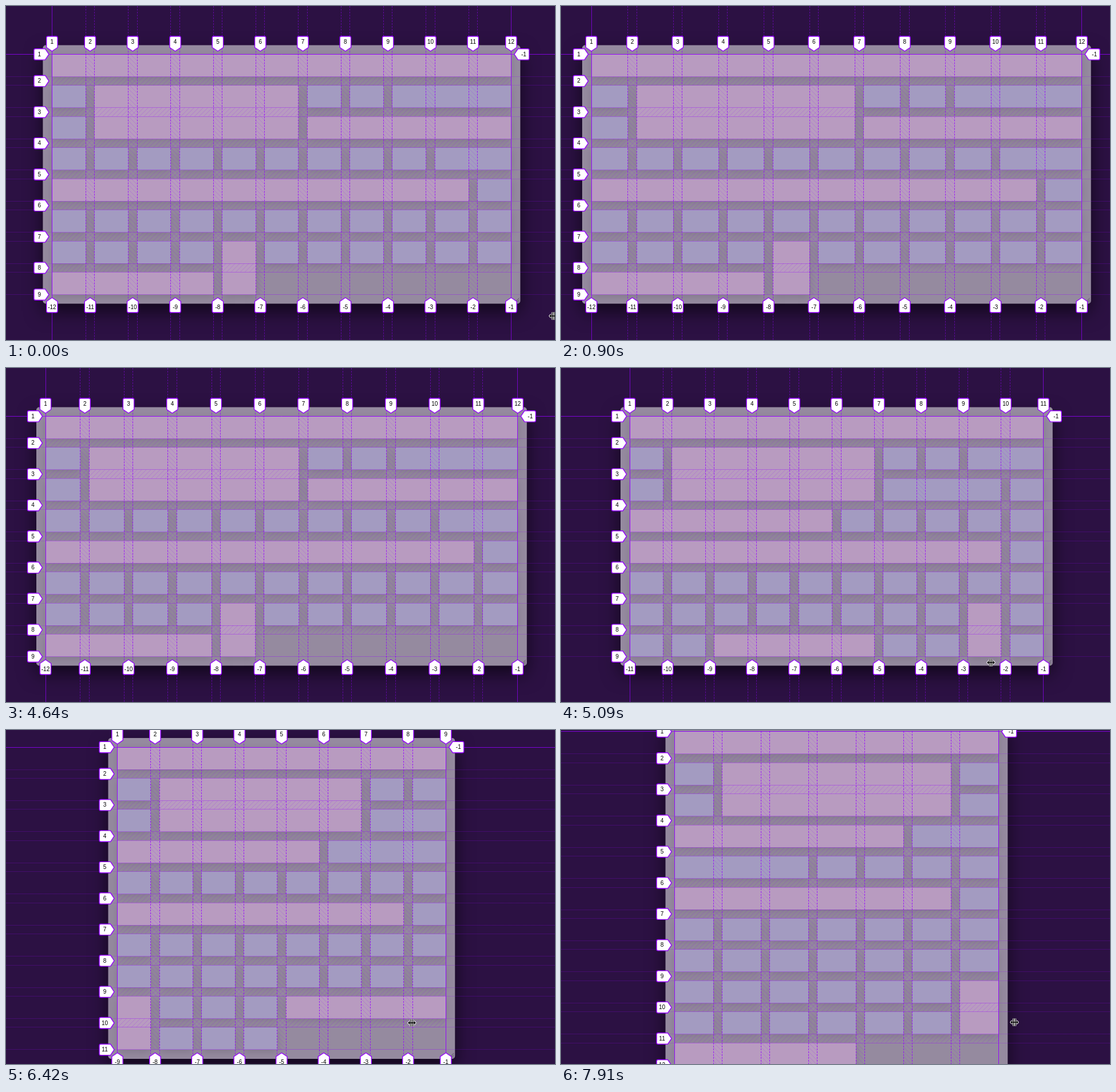
These frames come from a looping animation (959 by 584 pixels, 8 s). An HTML page with a canvas:

```html
<!DOCTYPE html>
<html lang="en">
<head>
<meta charset="utf-8">
<title>Dense grid resize</title>
<style>
  html, body { margin: 0; width: 100%; height: 100%; overflow: hidden; background: #2c1143; }
  canvas { display: block; width: 959px; height: 584px; }
</style>
</head>
<body>
<canvas id="stage" width="959" height="584"></canvas>
<script>
const ctx = document.getElementById('stage').getContext('2d');
const W = 959, H = 584, LOOP = 8000;
const CX = 481.4, CY = 294.5;
const GAP = 15.44, ROW = 39, MIN_COL = 57.9, PAD = 16;
const PURPLE = '#9400ff', PINK = '#b89bc0', BLUE = '#a39bc1', GREY = '#958a9f';

// [start ms, left edge of the grid, pointer x, pointer y]; the pointer is off stage at 999
const steps = [
  [0, 80.4, 956, 542], [150, 73, 960, 544], [300, 70, 999, 0], [450, 65, 999, 0],
  [600, 64.7, 999, 0], [750, 58.7, 999, 0], [900, 53, 999, 0], [4350, 53, 959, 534],
  [4500, 53.7, 999, 0], [4640, 69, 999, 0], [4790, 118, 863, 526], [4940, 120, 860, 526],
  [5090, 120, 751, 515], [5230, 164, 771, 513], [5380, 190, 717, 512], [5530, 192.2, 714, 512],
  [6280, 192.2, 711, 512], [6420, 194.5, 709, 512], [6570, 197, 705, 512],
  [6720, 199.4, 699, 511], [7770, 199.4, 730, 511], [7910, 198.5, 792, 511]
];

// Items in document order; "at" fixes the first column, otherwise it is found
function makeItems(cols) {
  const pink = (w, h, at) => [{ w, h, at, color: PINK }];
  const blue = (w, at) => [{ w, h: 1, at, color: BLUE }];
  const singles = count => Array.from({ length: count }, () => blue(1)[0]);
  return [].concat(
    pink(cols, 1, 0), singles(1), pink(5, 2), singles(2), pink(5, 1),
    blue(3), blue(2, cols - 2), singles(3), pink(cols - 1, 1, 0),
    singles(23), pink(1, 2), singles(3), pink(4, 1), singles(3)
  );
}

// Dense auto placement: every item takes the first hole it fits in
function place(cols) {
  const taken = new Set();
  let rows = 0;
  const cells = (item, r, c) => {
    const list = [];
    for (let y = r; y < r + item.h; y++)
      for (let x = c; x < c + item.w; x++) list.push(y * 100 + x);
    return list;
  };
  const items = makeItems(cols);
  for (const item of items) {
    const first = item.at ?? 0, last = item.at ?? cols - item.w;
    for (let r = 0; item.row === undefined; r++) {
      for (let c = first; c <= last; c++) {
        const spot = cells(item, r, c);
        if (spot.some(key => taken.has(key))) continue;
        spot.forEach(key => taken.add(key));
        item.row = r;
        item.col = c;
        break;
      }
    }
    rows = Math.max(rows, item.row + item.h);
  }
  return { items, rows };
}

const crisp = v => Math.floor(v) + 0.5;

function line(x1, y1, x2, y2, dash, alpha) {
  ctx.globalAlpha = alpha;
  ctx.setLineDash(dash);
  ctx.beginPath();
  ctx.moveTo(x1, y1);
  ctx.lineTo(x2, y2);
  ctx.stroke();
  ctx.setLineDash([]);
  ctx.globalAlpha = 1;
}

// dir 1 leans "/", dir -1 leans "\"
function hatch(x, y, w, h, dir) {
  ctx.save();
  ctx.beginPath();
  ctx.rect(x, y, w, h);
  ctx.clip();
  ctx.beginPath();
  for (let d = -h; d < w + h; d += 8) {
    ctx.moveTo(x + d, dir > 0 ? y + h : y);
    ctx.lineTo(x + d + h, dir > 0 ? y : y + h);
  }
  ctx.lineWidth = 0.7;
  ctx.globalAlpha = 0.3;
  ctx.stroke();
  ctx.restore();
}

// Label with its tip at (x, y); at turn 0 it points down
function tag(x, y, turn, text) {
  ctx.save();
  ctx.translate(x, y);
  ctx.save();
  ctx.rotate(turn * Math.PI / 2);
  ctx.beginPath();
  ctx.moveTo(0, -0.5);
  ctx.lineTo(9.7, -7);
  ctx.arcTo(9.7, -26.5, 0, -26.5, 2.5);
  ctx.arcTo(-9.7, -26.5, -9.7, -7, 2.5);
  ctx.lineTo(-9.7, -7);
  ctx.closePath();
  ctx.fillStyle = '#fff';
  ctx.fill();
  ctx.strokeStyle = PURPLE;
  ctx.lineWidth = 1.4;
  ctx.stroke();
  ctx.restore();
  const a = turn * Math.PI / 2;
  ctx.fillStyle = '#000';
  ctx.fillText(text, Math.sin(a) * 17, -Math.cos(a) * 17 + 0.5);
  ctx.restore();
}

function panel(x, y, w, h) {
  ctx.save();
  ctx.shadowColor = 'rgba(0,0,0,.6)';
  ctx.shadowBlur = 32;
  ctx.shadowOffsetY = 14;
  ctx.fillStyle = GREY;
  ctx.beginPath();
  ctx.roundRect(x, y, w, h, 5);
  ctx.fill();
  ctx.restore();
  ctx.strokeStyle = '#3f3548';
  ctx.lineWidth = 0.8;
  for (const d of [3, 6, 9]) line(x + w - 1 - d, y + h - 2, x + w - 2, y + h - 1 - d, [], 0.9);
}

function pointer(x, y) {
  const p = new Path2D('M-1.5-6.5V6.5M1.5-6.5V6.5M-6 0H6M-3.5-2.5L-6 0L-3.5 2.5M3.5-2.5L6 0L3.5 2.5');
  ctx.save();
  ctx.translate(x, y);
  ctx.lineJoin = 'round';
  for (const [color, width] of [['#fff', 3.2], ['#000', 1.4]]) {
    ctx.strokeStyle = color;
    ctx.lineWidth = width;
    ctx.stroke(p);
  }
  ctx.restore();
}

function draw([, left, px, py]) {
  const width = (CX - left) * 2;
  const cols = Math.floor((width + GAP) / (MIN_COL + GAP));
  const col = (width - GAP * (cols - 1)) / cols;
  const { items, rows } = place(cols);
  const height = rows * ROW + (rows - 1) * GAP;
  const top = CY - height / 2, right = left + width, bottom = top + height;
  const colX = i => left + i * (col + GAP);
  const rowY = i => top + i * (ROW + GAP);

  ctx.fillStyle = '#2c1143';
  ctx.fillRect(0, 0, W, H);
  panel(left - PAD, top - PAD, width + PAD * 2, height + PAD * 2);

  const fillItems = () => {
    for (const { col: c, row: r, w, h, color } of items) {
      ctx.fillStyle = color;
      ctx.fillRect(colX(c), rowY(r), w * (col + GAP) - GAP, h * (ROW + GAP) - GAP);
    }
  };
  ctx.save();
  ctx.shadowColor = 'rgba(0,0,0,.13)';
  ctx.shadowBlur = 14;
  ctx.shadowOffsetY = 4;
  fillItems();
  ctx.restore();
  fillItems();

  ctx.strokeStyle = PURPLE;
  ctx.lineWidth = 1;
  const vertical = (x, dash, inner, outer) => {
    x = crisp(x);
    line(x, 0, x, top - PAD, dash, outer);
    line(x, top - PAD, x, Math.min(bottom + PAD, H), dash, inner);
    line(x, bottom + PAD, x, Math.max(H, bottom + PAD), dash, outer);
  };
  const horizontal = (y, dash, inner, outer) => {
    y = crisp(y);
    line(0, y, left, y, dash, outer);
    line(left, y, right, y, dash, inner);
    line(right, y, W, y, dash, outer);
  };
  for (let i = 1; i < cols; i++) {
    hatch(colX(i) - GAP, top, GAP, height, -1);
    vertical(colX(i) - GAP, [3, 2], 0.85, 0.5);
    vertical(colX(i), [3, 2], 0.85, 0.5);
  }
  for (let i = 1; i < rows; i++) {
    hatch(left, rowY(i) - GAP, width, GAP, 1);
    horizontal(rowY(i) - GAP, [1, 1], 0.7, 0.45);
    horizontal(rowY(i), [1, 1], 0.7, 0.45);
  }
  horizontal(bottom, [1, 1], 0.7, 0.45);
  vertical(left, [], 0.95, 0.7);
  vertical(right, [], 0.95, 0.7);
  horizontal(top, [], 0.95, 0.8);

  ctx.font = '10px "Liberation Sans", Arial, sans-serif';
  ctx.textAlign = 'center';
  ctx.textBaseline = 'middle';
  const mid = (pos, i, count, end) => i === 0 ? pos(0) : i === count ? end : pos(i) - GAP / 2;
  for (let i = 0; i <= cols; i++) {
    const x = mid(colX, i, cols, right);
    tag(x, top - 5, 0, i + 1);
    tag(x, bottom + 5, 2, i - cols - 1);
  }
  for (let i = 0; i <= rows; i++) tag(left - 5, mid(rowY, i, rows, bottom), 3, i + 1);
  tag(right + 5, top, 1, -1);

  pointer(px, py);
}

let shown;
const start = performance.now();
function tick() {
  const t = (performance.now() - start) % LOOP;
  const step = steps.findLast(s => s[0] <= t);
  if (step !== shown) draw(shown = step);
  requestAnimationFrame(tick);
}
tick();
</script>
</body>
</html>
```
